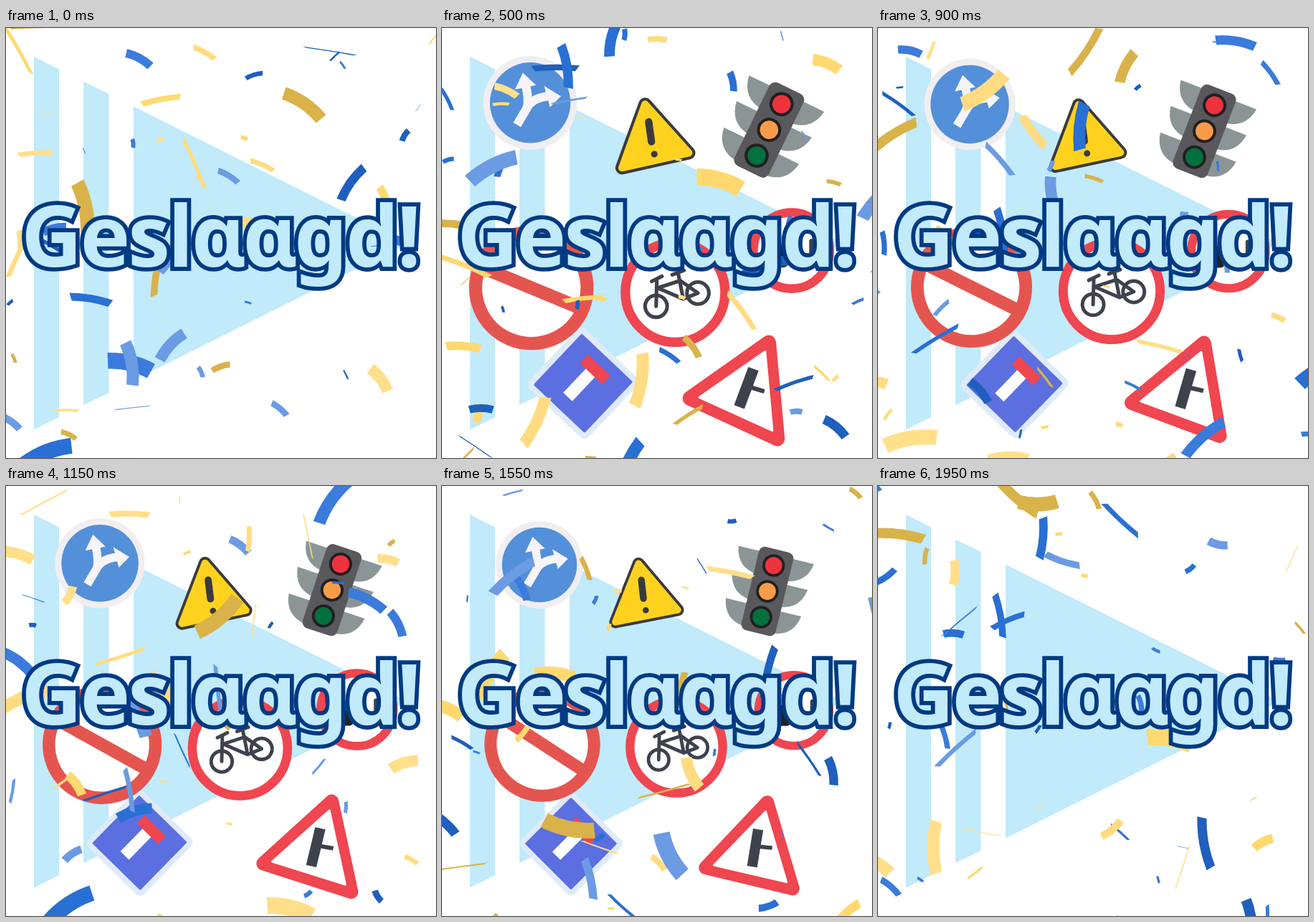
Write an HTML page that moves like this. It is 600 px wide and 600 px high and loops after 2 s.

```html
<!DOCTYPE html>
<html lang="nl">
<head>
<meta charset="utf-8">
<title>Geslaagd!</title>
<style>
  html, body { margin: 0; width: 100%; height: 100%; overflow: hidden; background: #fff; }
  svg { display: block; width: 100vw; height: 100vh; }
  .word {
    font: 700 118px "Noto Sans", "Open Sans", sans-serif;
    letter-spacing: -3px;
    fill: #c1eafb; stroke: #003a82; stroke-width: 11.5px; paint-order: stroke;
  }
  .line { fill: none; stroke: #3d424d; stroke-width: 5; stroke-linecap: round; stroke-linejoin: round; }
  .round { stroke-linejoin: round; }
  #confetti path { fill: none; }
</style>
</head>
<body>
<svg viewBox="0 0 600 600">
  <path fill="#c1eafb" d="M39 40L74 57.5V543L39 560.5ZM108 74.5L143.5 92V509L108 526ZM178 109.5L560 300.5L178 491.5Z"/>

  <g id="signs">
    <g id="fork">
      <circle r="64" fill="#f1eef2"/>
      <circle r="55" fill="#5390d9"/>
      <g fill="none" stroke="#f6f4f7" stroke-width="12">
        <path d="M-18 30L-5 8Q-1 0 -6 -24"/>
        <path d="M-5 8Q2 -7 26 -9"/>
      </g>
      <path fill="#f6f4f7" d="M-10 -41L8 -24L-21 -18ZM42 -9L19 -23L27 6Z"/>
    </g>

    <g id="warning" class="round">
      <path d="M-10 -52L-41 35L50 14Z" fill="#3a3a3e" stroke="#3a3a3e" stroke-width="18"/>
      <path d="M-10 -52L-41 35L50 14Z" fill="#ffd21f" stroke="#ffd21f" stroke-width="10"/>
      <path d="M-5 -28L-1 -1" stroke="#3a3a3e" stroke-width="10" stroke-linecap="round"/>
      <circle cx="3" cy="16" r="4.5" fill="#3a3a3e"/>
    </g>

    <g id="light">
      <g id="hoods" fill="#8c9596"></g>
      <rect x="-26" y="-63" width="52" height="126" rx="9" fill="#58585d"/>
      <g stroke="#231f20" stroke-width="4">
        <circle cy="-39" r="14.5" fill="#f0323f"/>
        <circle r="14.5" fill="#f89c49"/>
        <circle cy="39" r="14.5" fill="#03703f"/>
      </g>
    </g>

    <g id="passing">
      <circle r="52" fill="#fff" stroke="#ef4650" stroke-width="12"/>
      <rect x="-27" y="-8" width="22" height="31" rx="6" fill="#222"/>
      <rect x="24" y="-16" width="8" height="22" rx="3" fill="#3d424d"/>
    </g>

    <g id="bike">
      <circle r="68" fill="#fff" stroke="#ef4650" stroke-width="13"/>
      <g class="line">
        <circle cx="-26" cy="19" r="15"/>
        <circle cx="31" cy="1" r="15"/>
        <path d="M-32 -15L-18 -22M-25 -18L-26 19M-24 -6L7 -16L31 1L11 9ZM4 -26L11 9M-4 -24L12 -30"/>
      </g>
    </g>

    <g id="junction" class="round">
      <path d="M38 -66L-76 0L38 66Z" fill="#ef4650" stroke="#ef4650" stroke-width="20"/>
      <path d="M32 -54L-63 0L32 54Z" fill="#fff" stroke="#fff" stroke-width="3"/>
      <path d="M-10 18L14 -32" stroke="#3d424d" stroke-width="15"/>
      <path d="M4 -9L26 0" stroke="#3d424d" stroke-width="6"/>
    </g>

    <g id="deadend">
      <rect x="-56" y="-56" width="112" height="112" rx="9" fill="#dfebfa"/>
      <rect x="-48" y="-48" width="96" height="96" rx="2" fill="#5b6fe0"/>
      <rect x="-11" y="-18" width="17" height="46" fill="#fff"/>
      <rect x="-22" y="-33" width="42" height="16" fill="#ef4650"/>
    </g>

    <g id="ban">
      <circle r="76" fill="#fff" stroke="#e5554f" stroke-width="18"/>
      <path d="M-76 0H76" stroke="#e5554f" stroke-width="18"/>
    </g>
  </g>

  <g id="confetti"></g>
  <!-- the round one-storey a needs its own letter -->
  <text class="word" x="21" y="332.8" aria-label="Geslaagd!">Geslɑɑgd!</text>
</svg>

<script>
const LOOP = 2000, STEP = 50;
const $ = id => document.getElementById(id);
const clamp = v => Math.max(0, Math.min(1, v));
const mix = (a, b, p) => a + (b - a) * p;

function add(parent, d) {
  const el = document.createElementNS("http://www.w3.org/2000/svg", "path");
  el.setAttribute("d", d);
  return parent.appendChild(el);
}

for (const y of [-55, -16, 24]) {
  for (const s of [-1, 1]) {
    add($("hoods"), `M${20 * s} ${y}H${57 * s}Q${52 * s} ${y + 32} ${20 * s} ${y + 34}Z`);
  }
}

// in order of appearance; dx, dy and turn are the slow drift
const signs = [
  { id: "fork", x: 120, y: 103, dx: 16, dy: 7 },
  { id: "warning", x: 296, y: 160, dx: -14, dy: -2, turn: 2 },
  { id: "light", x: 457, y: 141, dx: -3, dy: 6, angle: 28.7, turn: -15 },
  { id: "passing", x: 487, y: 310, dx: 4, dy: 3 },
  { id: "bike", x: 325, y: 370, dx: 2, dy: -6 },
  { id: "junction", x: 420, y: 509, dx: 17, dy: 3, angle: -2.5, turn: -14 },
  { id: "deadend", x: 201, y: 495, dx: -21, dy: 4, angle: 43, turn: 2 },
  { id: "ban", x: 121, y: 363, dx: 19, dy: -3, angle: 20, turn: 13 }
];

function drawSigns(t) {
  const p = (t - 250) / 1300;
  signs.forEach(({ id, x, y, dx, dy, angle = 0, turn = 0 }, i) => {
    const shown = clamp((t - 28 - i * 33) / 65) * (1 - clamp((t - 1620 - i * 30) / 80));
    const size = shown * mix(1.04, .95, p);
    $(id).style.display = shown ? "" : "none";
    $(id).setAttribute("transform",
      `translate(${x + dx * p} ${y + dy * p}) rotate(${angle + turn * p}) scale(${size})`);
  });
}

// front and back of the paper
const papers = [
  ["#3b7bdb", "#1f5fbd"], ["#6b9be3", "#2a6fd3"],
  ["#ffdc82", "#d9b24a"], ["#ffd970", "#ffdf8a"]
];

let seed = 77;
const rand = (a = 0, b = 1) => {
  seed = (seed * 16807) % 2147483647;
  return mix(a, b, seed / 2147483647);
};

// larger ribbons are nearer, so they fall faster
const ribbons = Array.from({ length: 62 }, (_, i) => {
  const len = 9 + 66 * rand() ** 2.4;
  const wide = 3 + len * rand(.2, .34);
  const half = len / 2, bend = len * .07;
  const el = add($("confetti"), `M${-half} ${bend}Q0 ${-bend} ${half} ${bend}`);
  el.setAttribute("stroke-width", wide);
  return {
    el, paper: papers[i % papers.length],
    x: rand(0, 600), y: rand(0, 700), fall: .42 + len / 400, drift: rand(-.05, .06),
    angle: rand(-90, 90), spin: rand(-.08, .08),
    phase: rand(0, 2 * Math.PI), flip: rand(.003, .007)
  };
});

function drawConfetti(t) {
  for (const r of ribbons) {
    const x = r.x + r.drift * t;
    const y = (r.y + r.fall * t) % 700 - 50;
    const face = Math.cos(r.phase + r.flip * t);
    const thin = Math.max(.08, Math.abs(face));
    r.el.setAttribute("stroke", r.paper[face < 0 ? 1 : 0]);
    r.el.setAttribute("transform",
      `translate(${x} ${y}) rotate(${r.angle + r.spin * t}) scale(1 ${thin})`);
  }
}

const begin = performance.now();
function frame() {
  const t = Math.floor((performance.now() - begin) % LOOP / STEP) * STEP;
  drawSigns(t);
  drawConfetti(t);
  requestAnimationFrame(frame);
}
frame();
</script>
</body>
</html>
```
